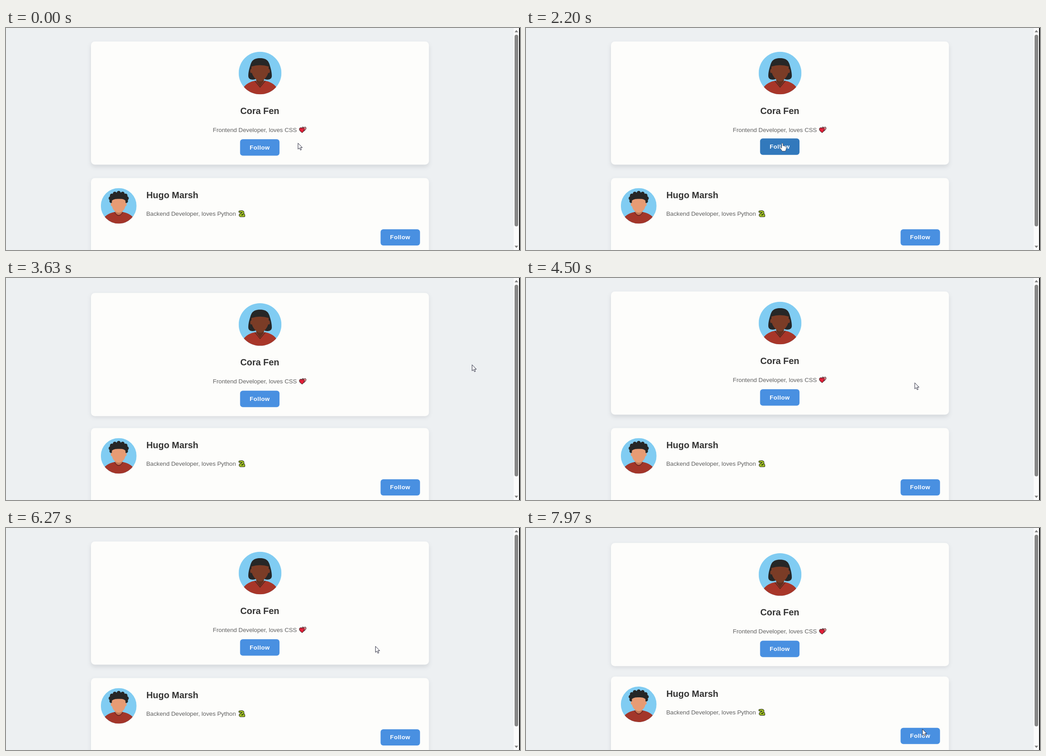
An HTML page for the animation above (8000 ms loop, 1137 by 493 pixels).

```html
<!DOCTYPE html>
<html lang="en">
<head>
<meta charset="utf-8">
<title>Profile cards</title>
<style>
html, body { margin: 0; width: 100%; height: 100%; overflow: hidden; background: #edf0f2; }
svg { display: block; width: 1137px; height: 493px; }
text { font-family: "Liberation Sans", Arial, sans-serif; }
.name { font-size: 19.9px; font-weight: bold; fill: #333; }
.bio { font-size: 13.27px; fill: #606060; }
.label { font-size: 13.3px; font-weight: bold; letter-spacing: .42px; fill: #fff; }
.card { fill: #fdfdfb; }
</style>
</head>
<body>
<svg viewBox="0 0 1137 493">
  <defs>
    <clipPath id="round1"><circle cx="47.5" cy="47.5" r="47.3"/></clipPath>
    <clipPath id="round2"><circle cx="39.5" cy="39.5" r="39.5"/></clipPath>
  </defs>

  <g id="card1">
    <rect class="card" x="188" y="30" width="747.6" height="273.5" rx="8.5"/>
    <g transform="translate(514.5 52.5)" clip-path="url(#round1)">
      <rect width="95" height="95" fill="#80ccf2"/>
      <path fill="#262727" d="M39 60C33 64 21.5 63 21.5 54C21.5 44 24.5 35 27 27C30.5 16.5 39 14.5 47.5 14.5S64.5 16.5 68 27C70.5 35 73.5 44 73.5 54C73.5 63 62 64 56 60Z"/>
      <path fill="#64301f" d="M39 56H56V66L47.5 79L39 66Z"/>
      <path fill="#a83629" d="M8 84C15 71 27 66 38 64.5L47.5 77L57 64.5C68 66 80 71 87 84V95H8Z"/>
      <path fill="none" stroke="#43211c" stroke-width="1.2" d="M36 65L47.5 79L59 65"/>
      <g fill="#7b3c26">
        <ellipse cx="28" cy="43" rx="2.2" ry="4.5"/>
        <ellipse cx="67" cy="43" rx="2.2" ry="4.5"/>
        <path d="M28.5 33Q47.5 27 66.5 33V42C66 53 55 66 47.5 66S29 53 28.5 42Z"/>
      </g>
    </g>
    <text class="name" x="561.3" y="190.8" text-anchor="middle">Cora Fen</text>
    <text class="bio" x="457.6" y="230.6">Frontend Developer, loves CSS</text>
    <g stroke="#1c1010" stroke-linejoin="round">
      <path fill="#f08a92" d="M659 229C655 226 653 223 655 220.6C656.6 219 658.4 219.8 659 221.4C660.4 219.2 663.4 219.4 663.8 222C664 225 661.5 227.5 659 229Z"/>
      <path fill="#e2213a" d="M655.3 232.4C651.5 230.4 648.6 227.6 649 224C649.6 220.8 653.4 220.4 654.8 223.2C656.4 220.8 659.8 221.6 660 224.6C660 228 657.6 230.6 655.3 232.4Z"/>
    </g>
    <g id="button1">
      <rect x="517.8" y="247" width="87.2" height="36.4" rx="6"/>
      <text class="label" x="539" y="269.6">Follow</text>
    </g>
  </g>

  <g id="card2">
    <rect class="card" x="188" y="333.2" width="747.6" height="220" rx="8.5"/>
    <g transform="translate(209.8 355.4)" clip-path="url(#round2)">
      <rect width="79" height="79" fill="#80ccf2"/>
      <g id="curls" fill="#262727"><ellipse cx="39.5" cy="22" rx="18" ry="12.5"/></g>
      <path fill="#c67a57" d="M31.5 46H47.5V62H31.5Z"/>
      <path fill="#a3362a" d="M4 70C11 58 22 55 31.5 53Q39.5 66 47.5 53C57 55 68 58 75 70V79H4Z"/>
      <path fill="none" stroke="#43211c" d="M30 53.5Q39.5 69 49 53.5"/>
      <g fill="#e79b74">
        <ellipse cx="24" cy="36.5" rx="1.9" ry="3.6"/>
        <ellipse cx="55" cy="36.5" rx="1.9" ry="3.6"/>
        <path d="M24.5 28C28 24.5 33 24 39.5 24S51 24.5 54.5 28V38C54 47 47 54.5 39.5 54.5S25 47 24.5 38Z"/>
      </g>
    </g>
    <text class="name" x="310.5" y="378.2">Hugo Marsh</text>
    <text class="bio" x="310.2" y="417.2">Backend Developer, loves Python</text>
    <g fill="none" stroke-linecap="round" stroke-linejoin="round">
      <path id="snake" d="M517 408L521.5 407.5C525.5 408 525.5 411.5 522 412.5C518 413.5 516.5 416 518.5 417.2H526.5L526 414.5"/>
      <use href="#snake" stroke="#1b220c" stroke-width="5"/>
      <use href="#snake" stroke="#a5c426" stroke-width="2.9"/>
      <path stroke="#1b220c" d="M518 407.5h.1"/>
    </g>
    <g fill="#4990e1">
      <rect x="828.6" y="447" width="87.2" height="36" rx="6"/>
      <text class="label" x="849.6" y="469">Follow</text>
    </g>
  </g>

  <g>
    <rect x="1123" width="12" height="493" fill="#fafafa"/>
    <rect x="1125" y="15" width="8" height="425.5" rx="4" fill="#868686"/>
    <path fill="#7a7a7a" d="M1125 9.5L1129 4.5L1133 9.5ZM1125 483.5L1129 488.5L1133 483.5Z"/>
    <rect x="1135" width="2" height="493" fill="#080808"/>
  </g>

  <g id="pointer" fill="#fff" stroke="#25263a" stroke-linejoin="round">
    <path id="arrow" d="M0 -.3V13.2L3.1 10.4L5.3 15.2L7.5 14.2L5.3 9.6H9.5Z"/>
    <path id="hand" stroke-width=".7" d="M-1.4 11V1.2C-1.4 -.6 1.4 -.6 1.4 1.2V6C2 5 3.7 5.2 3.9 6.6C4.6 5.7 6.2 6 6.3 7.3C7.2 6.6 8.5 7.2 8.5 8.5V12C8.5 14 7.4 15 7 17.5H-.6C-1 15 -3.4 13.4 -5.2 10.4C-6 8.8 -4.2 8 -3.2 9Z"/>
  </g>
</svg>

<script>
const $ = id => document.getElementById(id);
const LOOP = 8000, LIFT = 3.3, FADE = 290;

// pointer stops: time, x, y
const path = [
  [0, 646, 256], [330, 640, 259], [1600, 640, 259], [2200, 567, 256],
  [2900, 567, 256], [3630, 1031, 193], [3800, 1031, 193], [4270, 861, 232],
  [4500, 860, 233], [5330, 813, 249], [6170, 798, 258], [6750, 1038, 318],
  [6870, 1021, 326], [6970, 987, 339], [7370, 879, 418], [7530, 879, 418],
  [7970, 877, 447], [8000, 877, 447]
];

// hover switches: start state, then the times it flips
const hovers = {
  card1: [1, 3310, 3970, 6480],
  card2: [0, 7070],
  button1: [0, 1890, 2980]
};

// tangent that never overshoots, zero at rests and turns
function slope(i, k) {
  if (i < 1 || i > path.length - 2) return 0;
  const [p, c, n] = [path[i - 1], path[i], path[i + 1]];
  const a = (c[k] - p[k]) / (c[0] - p[0]), b = (n[k] - c[k]) / (n[0] - c[0]);
  return a * b <= 0 ? 0 : 2 * a * b / (a + b);
}

function pointerAt(t) {
  let i = 0;
  while (i < path.length - 2 && t >= path[i + 1][0]) i++;
  const a = path[i], b = path[i + 1], d = b[0] - a[0], s = (t - a[0]) / d, r = 1 - s;
  return [1, 2].map(k =>
    a[k] * r * r * (1 + 2 * s) + b[k] * s * s * (3 - 2 * s) +
    d * s * r * (slope(i, k) * r - slope(i + 1, k) * s));
}

// CSS "ease" curve
function ease(x) {
  let lo = 0, hi = 1;
  for (let i = 0; i < 18; i++) {
    const s = (lo + hi) / 2;
    if (.75 * s * (1 - s) + s ** 3 < x) lo = s; else hi = s;
  }
  return .3 * lo * (1 - lo) ** 2 + 3 * lo * lo * (1 - lo) + lo ** 3;
}

function hover(id, t) {
  const [start, ...flips] = hovers[id];
  let on = start, v = start;
  for (const f of flips) {
    if (t < f) break;
    on = 1 - on;
    const p = ease(Math.min(1, (t - f) / FADE));
    v = on ? p : 1 - p;
  }
  return v;
}

const mix = (a, b, v) => `rgb(${a.map((c, i) => Math.round(c + (b[i] - c) * v))})`;
const shift = (el, x, y) => el.setAttribute('transform', `translate(${x} ${y})`);

function setCard(id, base, v) {
  const card = $(id);
  shift(card, 0, base - LIFT * v);
  card.firstElementChild.style.filter =
    `drop-shadow(0 ${3 + 2 * v}px ${4 + v}px rgba(30,38,55,${.1 + .02 * v}))`;
}

function draw(now) {
  const t = now % LOOP;
  setCard('card1', LIFT, hover('card1', t));
  setCard('card2', 0, hover('card2', t));

  const b = hover('button1', t);
  shift($('button1'), 0, -1.7 * b);
  $('button1').firstElementChild.setAttribute('fill', mix([73, 144, 225], [50, 121, 188], b));

  const [x, y] = pointerAt(t), over = t >= 1890 && t < 2980;
  shift($('pointer'), x, y);
  $('hand').style.display = over ? '' : 'none';
  $('arrow').style.display = over ? 'none' : '';
  requestAnimationFrame(draw);
}

for (let i = 0; i < 9; i++) {
  const a = Math.PI * (.86 + i * .16);
  const curl = document.createElementNS($('curls').namespaceURI, 'circle');
  curl.setAttribute('cx', 39.5 + 18 * Math.cos(a));
  curl.setAttribute('cy', 23.5 + 12.8 * Math.sin(a));
  curl.setAttribute('r', 4.3);
  $('curls').append(curl);
}
requestAnimationFrame(draw);
</script>
</body>
</html>
```
